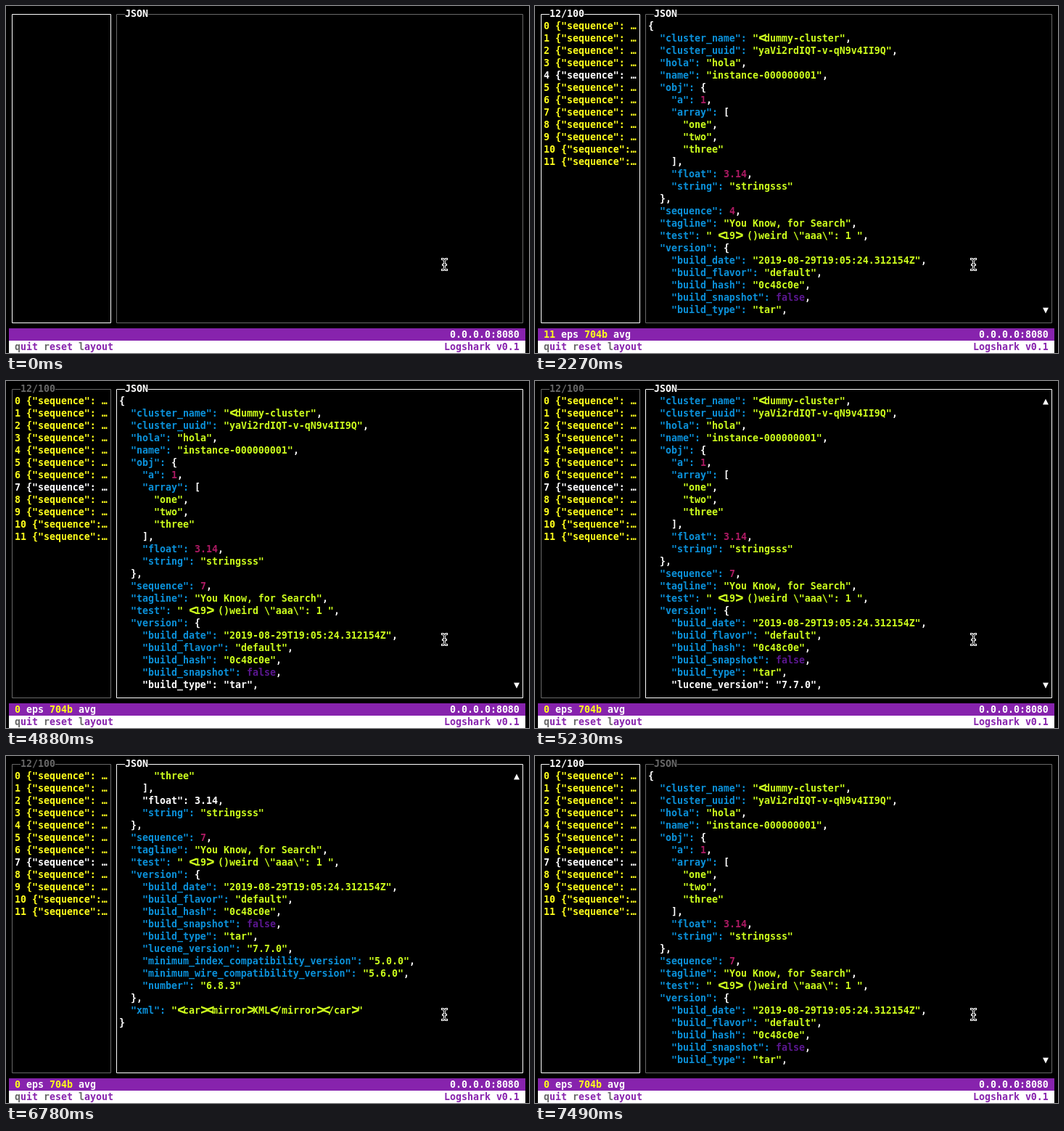
These frames come from a looping animation (721 px wide and 478 px high, 8 s). An HTML page:

```html
<!DOCTYPE html>
<html lang="en">
<head>
<meta charset="utf-8">
<title>Log viewer</title>
<style>
html, body { margin: 0; width: 100%; height: 100%; overflow: hidden; background: #000; }
svg { display: block; }
text { font: bold 13.288px "DejaVu Sans Mono", "DejaVu Sans", monospace; white-space: pre; }
</style>
</head>
<body>
<svg width="721" height="478" viewBox="0 0 721 478">
  <rect width="721" height="478"/>
  <g id="view"></g>
  <rect x="4" y="444" width="712" height="17" fill="#8723ad"/>
  <rect x="4" y="461" width="712" height="17" fill="#fff"/>
  <g id="bar"></g>
  <g id="pointer" fill="none" stroke-linecap="square"></g>
</svg>
<script>
const LOOP = 8000, ROWS = 24;
const C = {
  white: '#fff', dim: '#686868', yellow: '#ffff1c', key: '#0b91da',
  str: '#cdff1d', num: '#ad1a63', bool: '#5b1790', purple: '#8723ad'
};
const $ = id => document.getElementById(id);

const doc = String.raw`{
  "cluster_name": "ᐸdummy-cluster",
  "cluster_uuid": "yaVi2rdIQT-v-qN9v4II9Q",
  "hola": "hola",
  "name": "instance-000000001",
  "obj": {
    "a": 1,
    "array": [
      "one",
      "two",
      "three"
    ],
    "float": 3.14,
    "string": "stringsss"
  },
  "sequence": #,
  "tagline": "You Know, for Search",
  "test": " ᐸ19ᐳ ()weird \"aaa\": 1 ",
  "version": {
    "build_date": "2019-08-29T19:05:24.312154Z",
    "build_flavor": "default",
    "build_hash": "0c48c0e",
    "build_snapshot": false,
    "build_type": "tar",
    "lucene_version": "7.7.0",
    "minimum_index_compatibility_version": "5.0.0",
    "minimum_wire_compatibility_version": "5.6.0",
    "number": "6.8.3"
  },
  "xml": "ᐸcarᐳᐸmirrorᐳXMLᐸ/mirrorᐳᐸ/carᐳ"
}`.split('\n');

// Each track lists [time, value]; a value holds until the next one.
const steps = (from, gap, ...vals) => vals.map((v, i) => [from + i * gap, v]);
const tracks = {
  count: [[0, -1], [360, 0], [1080, 1], ...steps(1430, 120, 4, 7, 9, 12)],
  sel: [[0, 0], [1790, 1], [2030, 4], [2500, 5], [2620, 6], [3100, 7]],
  eps: [[0, 0], [1310, 1], [2270, 11], [3340, 0]],
  focus: [[0, 'list'], [3340, 'json'], [7490, 'list']],
  line: [[0, 0], [3580, 1], ...steps(3820, 118, 2, 5, 9, 12, 15, 19, 22),
    [4880, 23], ...steps(5120, 113, 24, 27, 30, 33),
    ...steps(6300, 120, 26, 23, 19, 16, 12, 9, 5), [7130, 2], [7250, 0]]
};
const at = (track, t) => track.reduce((v, [when, next]) => t >= when ? next : v, track[0][1]);

// The first visible line follows the caret, one line at a time.
function scrollAt(t) {
  let top = 0;
  for (const [when, n] of tracks.line) {
    if (when > t) break;
    top = Math.min(n, Math.max(top, n - ROWS + 1));
  }
  return top;
}

const esc = s => s.replace(/&/g, '&amp;').replace(/</g, '&lt;');

// Text on the character grid; wide brackets get a cell of their own.
function put(str, col, row, fill) {
  let out = '';
  for (const part of str.split(/([ᐸᐳ])/)) {
    if (part) out += `<text x="${4 + col * 8}" y="${15 + row * 17}" fill="${fill}">${esc(part)}</text>`;
    col += part.length;
  }
  return out;
}

function box(x1, x2, title, active, titleFill) {
  const from = x1 + 11.5, to = from + title.length * 8;
  const path = title
    ? `M${from} 11.5H${x1}V436.5H${x2}V11.5H${to}`
    : `M${x1} 11.5H${x2}V436.5H${x1}Z`;
  return `<path d="${path}" fill="none" stroke="${active ? C.white : C.dim}"/>` +
    put(title, (x1 + 7.5) / 8, 0, titleFill);
}

function colour(tok) {
  if (tok.endsWith('":')) return C.key;
  if (tok[0] === '"') return C.str;
  if (tok === 'false') return C.bool;
  return /\d/.test(tok) ? C.num : C.white;
}

function jsonLine(src, row, lit) {
  let out = '';
  for (const m of src.matchAll(/"(?:\\.|[^"\\])*":?|[\d.]+|false|[{}\[\],]/g))
    out += put(m[0], 19 + m.index, row, lit ? C.white : colour(m[0]));
  return out;
}

function viewHtml(s) {
  const inList = s.focus === 'list';
  let out = box(8.5, 144.5, s.count < 0 ? '' : s.count + '/100', inList, inList ? C.white : C.dim);
  out += box(152.5, 712.5, 'JSON', !inList, s.left ? C.dim : C.white);
  for (let i = 0; i < s.count; i++)
    out += put((i + ' {"sequence": ').slice(0, 15) + '…', 1, i + 1, i === s.sel ? C.white : C.yellow);
  if (s.count < 1) return out;
  doc.slice(s.top, s.top + ROWS).forEach((src, i) => {
    out += jsonLine(src.replace('#', s.sel), i + 1, !inList && s.top + i === s.line);
  });
  if (s.top > 0) out += put('▲', 87, 1, C.white);
  if (s.top + ROWS < doc.length) out += put('▼', 87, ROWS, C.white);
  return out;
}

function barHtml(s) {
  let out = '', col = 1;
  const add = (str, fill, row) => { out += put(str, col, row, fill); col += str.length; };
  if (s.count >= 0) {
    add('' + s.eps, C.yellow, 26);
    add(' eps ', C.white, 26);
    add(s.count ? '704b' : '0b', C.yellow, 26);
    add(' avg', C.white, 26);
  }
  col = 1;
  for (const word of ['quit', 'reset', 'layout']) {
    add(word[0], C.dim, 27);
    add(word.slice(1) + ' ', C.purple, 27);
  }
  return out + put('0.0.0.0:8080', 76, 26, C.white) + put('Logshark v0.1', 75, 27, C.purple);
}

const beam = 'M601.5 348.5Q604.5 348.5 604.5 351.5V360.5Q604.5 363.5 601.5 363.5' +
  'M607.5 348.5Q604.5 348.5 604.5 351.5M604.5 360.5Q604.5 363.5 607.5 363.5M602.5 356.5H606.5';
$('pointer').innerHTML = `<path d="${beam}" stroke="#fff" stroke-width="3"/><path d="${beam}" stroke="#000"/>`;

let last = '';
function draw(t) {
  const s = { top: scrollAt(t), left: t >= 7490 };
  for (const name in tracks) s[name] = at(tracks[name], t);
  const key = JSON.stringify(s);
  if (key === last) return;
  last = key;
  $('view').innerHTML = viewHtml(s);
  $('bar').innerHTML = barHtml(s);
}

const start = performance.now();
function tick() {
  draw((performance.now() - start) % LOOP);
  requestAnimationFrame(tick);
}
draw(0);
tick();
</script>
</body>
</html>
```
